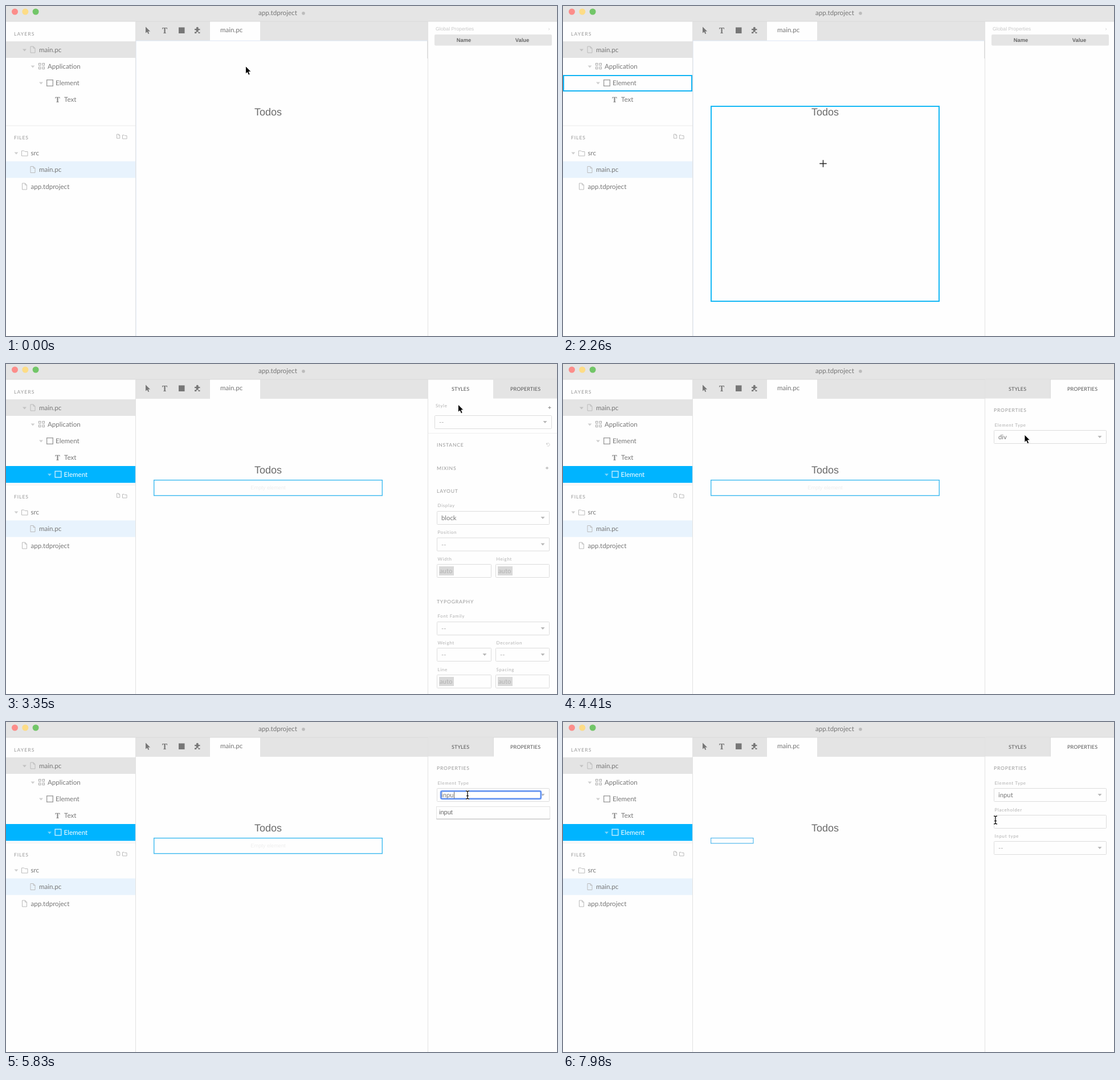
These frames come from a looping animation (967 px wide and 579 px high, 8 s). An HTML page:

```html
<!DOCTYPE html>
<html lang="en">
<head>
<meta charset="utf-8">
<title>Editor</title>
<style>
html, body { margin: 0; width: 100%; height: 100%; overflow: hidden; background: #fefefe; }
svg { display: block; width: 967px; height: 579px; }
text { font-family: Lato, "Open Sans", sans-serif; font-size: 11.6px; fill: #777; white-space: pre; text-rendering: geometricPrecision; }
.head { font-size: 8.6px; letter-spacing: .8px; fill: #999; }
.label { font-size: 8px; letter-spacing: .65px; fill: #b0b0b0; }
.tab { font-size: 9px; letter-spacing: .1px; fill: #555; }
.field { font-size: 11.3px; }
.sans { font-family: "Liberation Sans", Arial, sans-serif; }
.serif { font-family: "Noto Serif", "Liberation Serif", serif; font-weight: 700; }
.th { font-size: 9.3px; font-weight: 700; fill: #666; }
.badge { font-size: 9.5px; font-weight: 700; letter-spacing: .6px; fill: #fff; }
</style>
</head>
<body>
<svg id="stage" viewBox="0 0 967 579"></svg>
<script>
const LOOP = 8000;
const stage = document.getElementById('stage');

const rect = (x, y, w, h, fill, more = '') =>
  `<rect x="${x}" y="${y}" width="${w}" height="${h}" fill="${fill}" ${more}/>`;
const frame = (x, y, w, h, color, line = 1, more = '') =>
  rect(x + line / 2, y + line / 2, w - line, h - line, 'none', `stroke="${color}" stroke-width="${line}" ${more}`);
const text = (x, y, s, cls = '', more = '') => `<text x="${x}" y="${y}" class="${cls}" ${more}>${s}</text>`;
const path = (d, color, line = 1) => `<path d="${d}" fill="none" stroke="${color}" stroke-width="${line}"/>`;
const shape = (d, fill, more = '') => `<path d="${d}" fill="${fill}" ${more}/>`;
const group = (id, body) => `<g id="${id}">${body}</g>`;

const chevron = (x, y, c = '#cfcfcf') => shape(`M${x - 3.5} ${y - 1.5}h7l-3.5 4z`, c);
const caret = (x, y) => shape(`M${x - 3.5} ${y - 2}h7l-3.5 4z`, '#b8b8b8');
const plus = (x, y, c) => path(`M${x - 2.5} ${y}h5M${x} ${y - 2.5}v5`, c);
const fileIcon = (x, y, s = 1) =>
  path(`M${x} ${y}h${5 * s}l${3 * s} ${3 * s}v${8 * s}h${-8 * s}zM${x + 5 * s} ${y}v${3 * s}h${3 * s}`, '#bbb');
const folderIcon = (x, y, s = 1) =>
  path(`M${x} ${y}h${4 * s}l${1.5 * s} ${1.5 * s}h${5 * s}v${7.5 * s}h${-10.5 * s}z`, '#bbb');
const grid = (x, y) => [0, 6.5].map(dx => [0, 6.5].map(dy => frame(x + dx, y + dy, 4.5, 4.5, '#aaa')).join('')).join('');
const box = (x, y, c) => frame(x, y, 12, 12, c, 1.3);
const select = (x, y, w, value, cls = 'field') =>
  frame(x, y, w, 24, '#dcdcdc', 1, 'rx="1"') + text(x + 8, y + 16, value, cls) + caret(x + w - 12, y + 12);
const auto = (x, y, w) =>
  frame(x, y, w, 24, '#dcdcdc', 1, 'rx="1"') + rect(x + 4, y + 4, 26, 16, '#d9d9d9') +
  text(x + 5, y + 16, 'auto', 'field', 'style="fill:#b2b2b2"');
const none = (x, y, w) => select(x, y, w, '<tspan fill="#aaa">--</tspan>');

const chrome =
  rect(0, 0, 967, 579, '#fefefe') +
  rect(0, 0, 967, 27, '#e5e5e5') +
  ['#fc8d8a', '#fddc86', '#72c668'].map((c, i) => `<circle cx="${15.5 + i * 18.3}" cy="10" r="5.5" fill="${c}"/>`).join('') +
  text(443, 16, 'app.tdproject') + '<circle cx="522" cy="12.7" r="2.8" fill="#bcbcbc"/>' +
  rect(228, 27, 512, 34, '#e4e4e4') + rect(358, 27, 88, 34, '#fefefe') +
  rect(0, 26.5, 967, 1, '#dadada') +
  text(376, 46, 'main.pc') +
  shape('M245 36.5v11l2.7-2.3 1.8 3.8 1.8-.8-1.8-3.7h3.6z', '#777') +
  text(278.5, 47.5, 'T', 'serif', 'text-anchor="middle" style="font-size:14px"') +
  rect(303, 37.5, 10.5, 10.5, '#777') +
  shape('M331 40h3.2a2 2 0 1 1 3.2 0h3v2.6a1.9 1.9 0 1 0 0 3v2.4h-3a1.8 1.8 0 1 0-3 0h-3.4v-2.8a1.8 1.8 0 1 0 0-2.8z', '#777') +
  rect(227, 27, 1, 552, '#e2e2e2') + rect(740, 27, 1, 552, '#e2e2e2');

const layers =
  text(14, 51.5, 'LAYERS', 'head', 'style="letter-spacing:1.1px"') +
  rect(0, 62, 227, 29, '#e4e4e4') +
  chevron(32.5, 77, '#c2c2c2') + fileIcon(43, 71) + text(58, 81, 'main.pc') +
  chevron(47, 106) + grid(57, 100) + text(73, 110, 'Application') +
  chevron(61.5, 135) + box(71, 129, '#999') + text(87, 139, 'Element') +
  text(90.5, 168.5, 'T', 'serif', 'text-anchor="middle" style="font-size:13px;fill:#888"') + text(102, 168, 'Text');

const files =
  rect(0, 209.5, 227, 1, '#ececec') +
  text(14, 233.5, 'FILES', 'head', 'style="letter-spacing:.9px"') +
  fileIcon(194.5, 225, .65) + folderIcon(204.5, 226.5, .72) +
  chevron(18, 258) + folderIcon(27.5, 254) + text(43.5, 262, 'src') +
  rect(0, 272.5, 227, 29, '#e8f3fd') + fileIcon(43, 281.5) + text(58, 291, 'main.pc') +
  fileIcon(28.5, 311) + text(43.5, 320.5, 'app.tdproject');

const globals =
  text(754, 43, 'Global Properties', 'sans', 'style="font-size:8.7px;fill:#c8c8c8"') +
  text(951.5, 43, '›', 'sans', 'style="font-size:9px;fill:#ccc"') +
  rect(752, 50, 206, 19.5, '#e5e5e5', 'rx="2"') +
  text(803.5, 63, 'Name', 'sans th', 'text-anchor="middle"') +
  text(906, 63, 'Value', 'sans th', 'text-anchor="middle"');

const tabs = text(782, 46.5, 'STYLES', 'tab') + text(885, 46.5, 'PROPERTIES', 'tab');
const idleTab = (x, w) => rect(x, 27, w, 33.5, '#e4e4e4');

const styles =
  idleTab(855, 112) + tabs +
  text(754, 76, 'Style', 'label') + plus(954, 76.5, '#888') + none(752, 90, 206) +
  rect(741, 121, 226, 1, '#efefef') +
  text(756, 144.5, 'INSTANCE', 'head') + path('M948.5 138.5v2.5h2.5M948.7 141a2.7 2.7 0 1 1 1 2.6', '#ccc', .9) +
  text(756, 185.5, 'MIXINS', 'head') + plus(949.5, 182.5, '#aaa') +
  text(756, 226, 'LAYOUT', 'head') +
  text(757.5, 251, 'Display', 'label') + select(756, 258, 198, 'block') +
  text(757.5, 298, 'Position', 'label') + none(756, 304.5, 198) +
  text(757.5, 345, 'Width', 'label') + text(860.5, 345, 'Height', 'label') +
  auto(756, 351, 96) + auto(859, 351, 95) +
  text(756, 420, 'TYPOGRAPHY', 'head') +
  text(757.5, 445, 'Font Family', 'label') + none(756, 452, 198) +
  text(757.5, 492, 'Weight', 'label') + text(860.5, 492, 'Decoration', 'label') +
  none(756, 498, 96) + none(859, 498, 95) +
  text(757.5, 538.5, 'Line', 'label') + text(860.5, 538.5, 'Spacing', 'label') +
  auto(756, 545, 96) + auto(859, 545, 95);

const properties =
  idleTab(741, 114) + rect(855, 27, 1, 33.5, '#dcdcdc') + tabs +
  text(756, 83.5, 'PROPERTIES', 'head') +
  text(757.5, 110, 'Element Type', 'label') +
  select(756, 116, 198, '<tspan id="kind"></tspan>');

const extra =
  text(757.5, 156.5, 'Placeholder', 'label') + frame(756, 163, 198, 24, '#dcdcdc', 1, 'rx="1"') +
  text(757.5, 203, 'Input type', 'label') + none(756, 209, 198);

const editor =
  rect(763, 121, 177, 14, '#fefefe') +
  frame(761.5, 119.5, 179, 17, '#a9c4fa', 2, 'rx="3"') +
  frame(762.5, 120.5, 177, 15, '#5488ee', 2, 'rx="2"') +
  text(764, 132, '', 'field', 'id="typed"') + rect(0, 122.5, 1, 11.5, '#666', 'id="bar"');

const arrow = shape('M0 0V13.6L3 10.8 5.2 15.7 7.7 14.6 5.5 9.8H9.6Z', '#000', 'stroke="#fff" stroke-width=".9"');
const cross = path('M-6.2 0h12.4M0 -6.2v12.4', '#222', 1.4);
const beamLine = 'M-3 -7q2.5 0 3 1.5q.5 -1.5 3 -1.5M0 -5.5v11M-3 7q2.5 0 3 -1.5q.5 1.5 3 1.5M-1.8 1.5h3.6';
const beam = path(beamLine, '#fff', 3) + path(beamLine, '#111', 1.3);

stage.innerHTML = chrome + layers + group('files', files) +
  group('glow', rect(228, 60.5, 512, 1, '#dde8f6') + rect(228, 61, 1, 518, '#e9f0f9') + rect(739, 61, 1, 31, '#dedede')) +
  text(460, 192, 'Todos', 'sans', 'text-anchor="middle" style="font-size:18px;fill:#6a6a6a"') +
  group('globals', globals) + group('styles', styles) + group('props', properties) + group('extra', extra) +
  group('row', rect(0, 179, 227, 29.5, '#00b4ff') + chevron(76.5, 194, '#7fd5fa') + box(85.5, 187.5, '#d8f3ff') +
    text(101.5, 198, 'Element', '', 'style="fill:#fff"')) +
  group('rowHover', frame(0, 121, 227, 29, '#12b4f4', 2)) +
  group('hover', frame(259, 175, 402, 344, '#51b6f8', 2) + rect(600, 521, 61, 20, '#57b7ff', 'rx="1"') +
    text(607, 534.5, '700 x 600', 'badge')) +
  group('dropZone', frame(259, 175, 402, 344, '#14b8f5', 2)) +
  group('wide', frame(259, 203, 402, 28.5, '#3dbaf0', 1.4) +
    text(460, 220, 'Empty element', 'sans', 'text-anchor="middle" style="font-size:9.2px;fill:#eee"')) +
  group('small', frame(259, 203, 75.5, 10.5, '#55b9ee', 1.2)) +
  group('editor', editor) + group('menu', '') +
  group('arrow', arrow) + group('cross', cross) + group('beam', beam);

const $ = id => document.getElementById(id);

// id: list of [from, to) spans during which it is visible
const spans = {
  glow: [[0, 2520]],
  globals: [[0, 2520]],
  styles: [[2520, 3860]],
  props: [[3860, LOOP]],
  extra: [[7080, LOOP]],
  row: [[2520, LOOP]],
  rowHover: [[430, 3250]],
  hover: [[430, 1800], [2630, 3250]],
  dropZone: [[1800, 2630]],
  wide: [[2520, 7080]],
  small: [[7080, LOOP]],
  editor: [[4590, 6990]],
  menu: [[4680, 6990]],
  bar: [[4590, 6630], [6810, 6990]]
};

// time, pointer, x, y
const moves = [
  [0, 'arrow', 420.5, 105.5], [180, 'arrow', 420, 110],
  [330, 'arrow', 420, 146], [430, 'arrow', 420, 222], [530, 'arrow', 419.5, 268], [630, 'arrow', 419.5, 282.5],
  [1800, 'cross', 424, 287], [1890, 'cross', 431, 285], [1980, 'cross', 441, 281],
  [2070, 'cross', 449, 278.5], [2160, 'cross', 454, 277], [2260, 'cross', 456.5, 276.5],
  [2630, 'arrow', 456, 276], [3000, 'arrow', 457, 275],
  [3150, 'arrow', 520, 236], [3250, 'arrow', 680, 140], [3350, 'arrow', 793.5, 71],
  [3470, 'arrow', 850, 55], [3570, 'arrow', 878, 50.5], [3680, 'arrow', 885, 49.5],
  [4120, 'arrow', 880, 56], [4210, 'arrow', 858, 77], [4320, 'arrow', 826, 108],
  [4410, 'arrow', 810, 124], [4500, 'beam', 810, 128],
  [6280, 'beam', 795, 135], [6360, 'arrow', 772, 161], [6450, 'arrow', 758, 170],
  [6630, 'arrow', 760, 168], [6720, 'arrow', 764, 165], [6810, 'arrow', 767, 162],
  [7080, 'beam', 767, 163], [7980, 'beam', 759, 172]
];

const keys = [[0, ''], [5480, 'i'], [5570, 'in'], [5660, 'inp'], [5750, 'inpu']];
const tags = ['a', 'abbr', 'address', 'article', 'aside', 'audio', 'b', 'bdi', 'i', 'iframe', 'img', 'input', 'ins'];
const at = (list, t) => list.filter(step => step[0] <= t).pop();

function fillMenu(word) {
  const found = tags.filter(tag => tag.startsWith(word)).slice(0, 8);
  const h = 22 + (found.length - 1) * 23;
  $('menu').innerHTML =
    rect(755.5, 149.5, 199, h, '#000', 'opacity=".08" rx="1"') +
    rect(755, 148, 200, h + .8, '#c9c9c9', 'rx="1"') +
    rect(755.5, 148.5, 199, h - 1, '#fefefe') +
    found.map((tag, i) => text(760, 162 + i * 23, tag, 'sans', 'style="font-size:11px;fill:#666"')).join('');
}

let shownWord = null;
function draw(t) {
  for (const id in spans) {
    const on = spans[id].some(([from, to]) => t >= from && t < to);
    $(id).style.display = on ? '' : 'none';
  }
  $('files').setAttribute('transform', `translate(0 ${t < 2520 ? 0 : 2})`);

  const [, kind, x, y] = at(moves, t);
  for (const id of ['arrow', 'cross', 'beam']) $(id).style.display = id === kind ? '' : 'none';
  $(kind).setAttribute('transform', `translate(${x} ${y})`);

  $('kind').textContent = t < 4590 ? 'div' : t < 6990 ? '' : 'input';
  const word = at(keys, t)[1];
  if (word !== shownWord) {
    shownWord = word;
    $('typed').textContent = word;
    fillMenu(word);
  }
  $('bar').setAttribute('x', 764.5 + (word ? $('typed').getComputedTextLength() : 0));
}

const start = performance.now();
function tick() {
  draw((performance.now() - start) % LOOP);
  requestAnimationFrame(tick);
}
tick();
</script>
</body>
</html>
```
